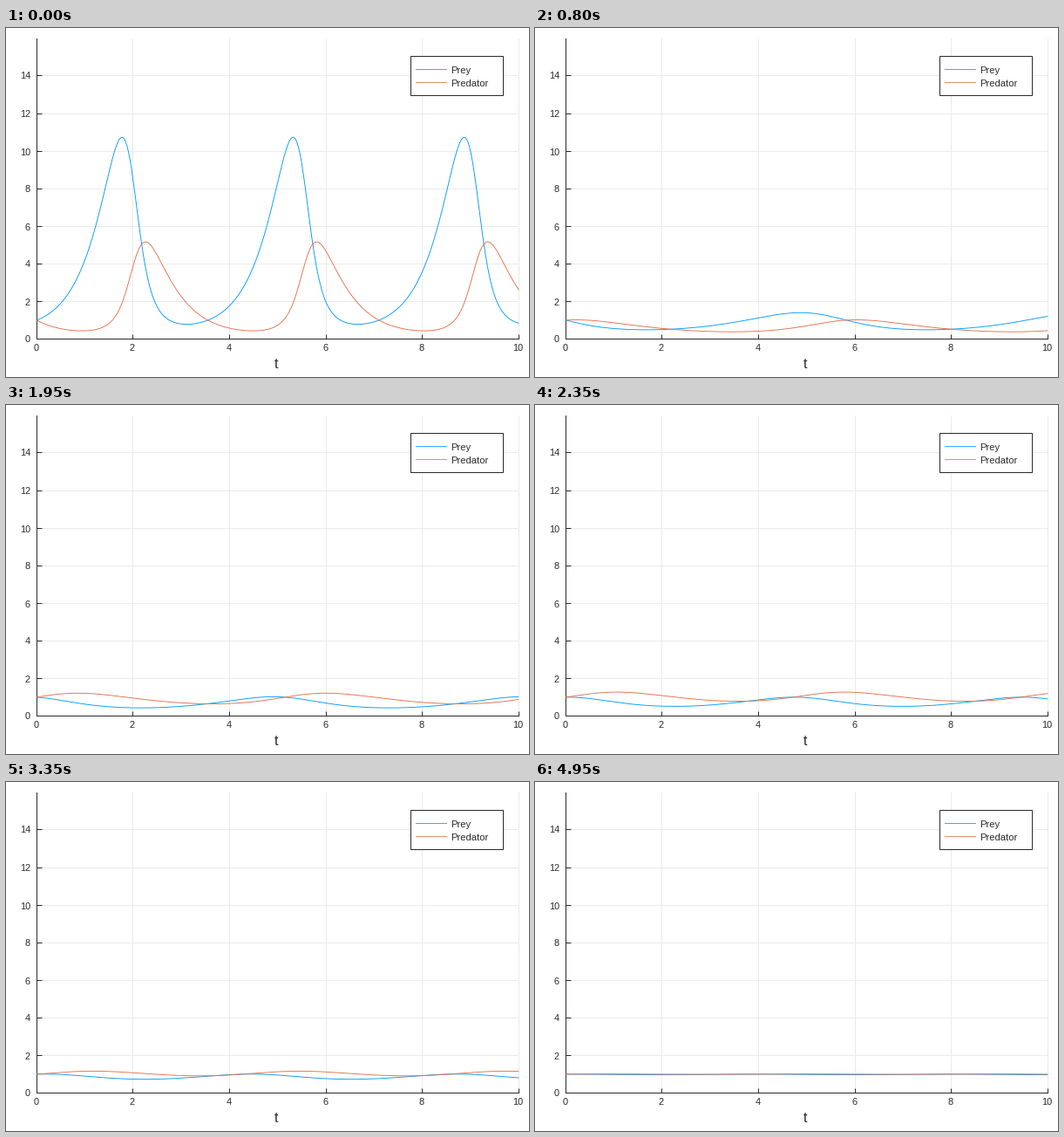
A matplotlib script that plays this animation: 600x400 px, repeating every 5 s.

```python
"""Lotka-Volterra curves flattening while Adam tunes the four rates."""
import numpy as np
import matplotlib.pyplot as plt
from matplotlib.animation import FuncAnimation
from matplotlib.patches import Rectangle

plt.rcParams["font.family"] = "Liberation Sans"

W, H, DPI = 600, 400, 100
PX = 72 / DPI                      # one pixel in points
FRAMES, INTERVAL = 100, 50
BLUE, ORANGE = "#009afa", "#e36f47"
INK, GRID = "#2a2a2a", "#eaeaea"
X0, Y0, SX, SY = 35.3, 356.4, 55.3, 21.53

# Rates are ordered: prey growth, predation, predator death, predator growth
START = np.array([2.2, 1.0, 2.0, 0.4])
RATE, DECAY1, DECAY2 = 0.1, 0.9, 0.999

# Loss weights on (prey, predator); the course nearest the waypoints is used
WEIGHTS = np.array([[1, 1], [1, 0], [0, 1]])
WAYPOINTS = {
    8: (1.42, 1.60, 1.33, 1.00),
    24: (1.30, 1.90, 0.95, 1.31),
    39: (1.63, 1.86, 0.94, 1.37),
    55: (1.90, 1.82, 1.05, 1.32),
    67: (1.87, 1.80, 1.12, 1.29),
    99: (1.80, 1.80, 1.24, 1.27),
}


def solve(rates, points=100, sub=4, span=10.0):
    """RK4 from (1, 1) for many rate sets at once; the last axis holds the rates."""
    a, b, d, g = np.moveaxis(rates, -1, 0)

    def slope(u):
        x, y = u
        return np.array([x * (a - b * y), y * (g * x - d)])

    h = span / points / sub
    u = np.ones((2,) + a.shape)
    out = [u]
    for _ in range(points):
        for _ in range(sub):
            k1 = slope(u)
            k2 = slope(u + h / 2 * k1)
            k3 = slope(u + h / 2 * k2)
            k4 = slope(u + h * k3)
            u = u + h / 6 * (k1 + 2 * k2 + 2 * k3 + k4)
        out.append(u)
    return np.array(out)


def gradient(rates, eps=1e-5):
    """Central differences of the squared distance to 1."""
    shift = eps * np.vstack([np.eye(4), -np.eye(4)])
    u = solve(rates[:, None, :] + shift)
    loss = (((u - 1) ** 2).sum(0) * WEIGHTS.T[:, :, None]).sum(0)
    return (loss[:, :4] - loss[:, 4:]) / (2 * eps)


def descend(steps):
    p = np.tile(START, (len(WEIGHTS), 1))
    m, v = np.zeros_like(p), np.zeros_like(p)
    path = []
    for n in range(1, steps + 1):
        grad = gradient(p)
        m = DECAY1 * m + (1 - DECAY1) * grad
        v = DECAY2 * v + (1 - DECAY2) * grad ** 2
        step = m / (1 - DECAY1 ** n) / (np.sqrt(v / (1 - DECAY2 ** n)) + 1e-8)
        p = p - RATE * step
        path.append(p)
    return np.array(path)


def rate_course():
    marks = np.array(list(WAYPOINTS.values()))
    paths = descend(FRAMES)
    miss = np.abs(paths[list(WAYPOINTS)] - marks[:, None]).sum((0, 2))
    return paths[:, miss.argmin()]


def to_x(t):
    return X0 + SX * t


def to_y(value):
    return Y0 - SY * value


def mid(v):
    return np.floor(v) + 0.5       # centre of a pixel


fig = plt.figure(figsize=(W / DPI, H / DPI), dpi=DPI, facecolor="white")
ax = fig.add_axes([0, 0, 1, 1])
ax.set_xlim(0, W)
ax.set_ylim(H, 0)
ax.axis("off")


def line(xs, ys, color, z, width=1.0):
    return ax.plot(xs, ys, color=color, lw=width * PX, zorder=z, snap=False,
                   solid_capstyle="butt")[0]


def label(x, y, text, size=11, ha="center"):
    ax.text(x, y, text, fontsize=size * PX, color=INK, ha=ha, va="baseline", zorder=6)


left, bottom, right, top = 35.5, 356.5, 588.5, 12
for t in range(0, 11, 2):
    x = mid(to_x(t))
    if t:
        line([x, x], [top, bottom], GRID, 1)
    line([x, x], [bottom, bottom - 5], INK, 2)
    label(to_x(t) - 1, 370, str(t))
for value in range(0, 15, 2):
    y = mid(to_y(value))
    if value:
        line([left, right], [y, y], GRID, 1)
    line([left, left + 6], [y, y], INK, 2)
    label(28, y + 4, str(value), ha="right")
line([left, left], [top, bottom + 0.5], INK, 2)
line([left - 0.5, right + 0.5], [bottom, bottom], INK, 2)
label(310, 390, "t", 16)

ax.add_patch(Rectangle((464.5, 32.5), 106, 45, fc="white", ec=INK,
                       lw=PX, zorder=4, snap=False))
for y, color, name in ((47.5, BLUE, "Prey"), (62.5, ORANGE, "Predator")):
    line([470, 506], [y, y], color, 5, 0.8)
    label(510.5, y + 4.3, name, 11.2, ha="left")

# Drawn finer than the loss is sampled, so the peaks stay round
POINTS = 400
times = to_x(np.linspace(0, 10, POINTS + 1))
heights = to_y(solve(rate_course(), POINTS, 1))
curves = [line(times, heights[:, i, 0], c, 3, 0.9)
          for i, c in enumerate((BLUE, ORANGE))]


def draw(n):
    for i, curve in enumerate(curves):
        curve.set_ydata(heights[:, i, n])
    return curves


anim = FuncAnimation(fig, draw, frames=FRAMES, interval=INTERVAL,
                     init_func=lambda: draw(0), repeat=True, repeat_delay=0)
plt.show()
```
